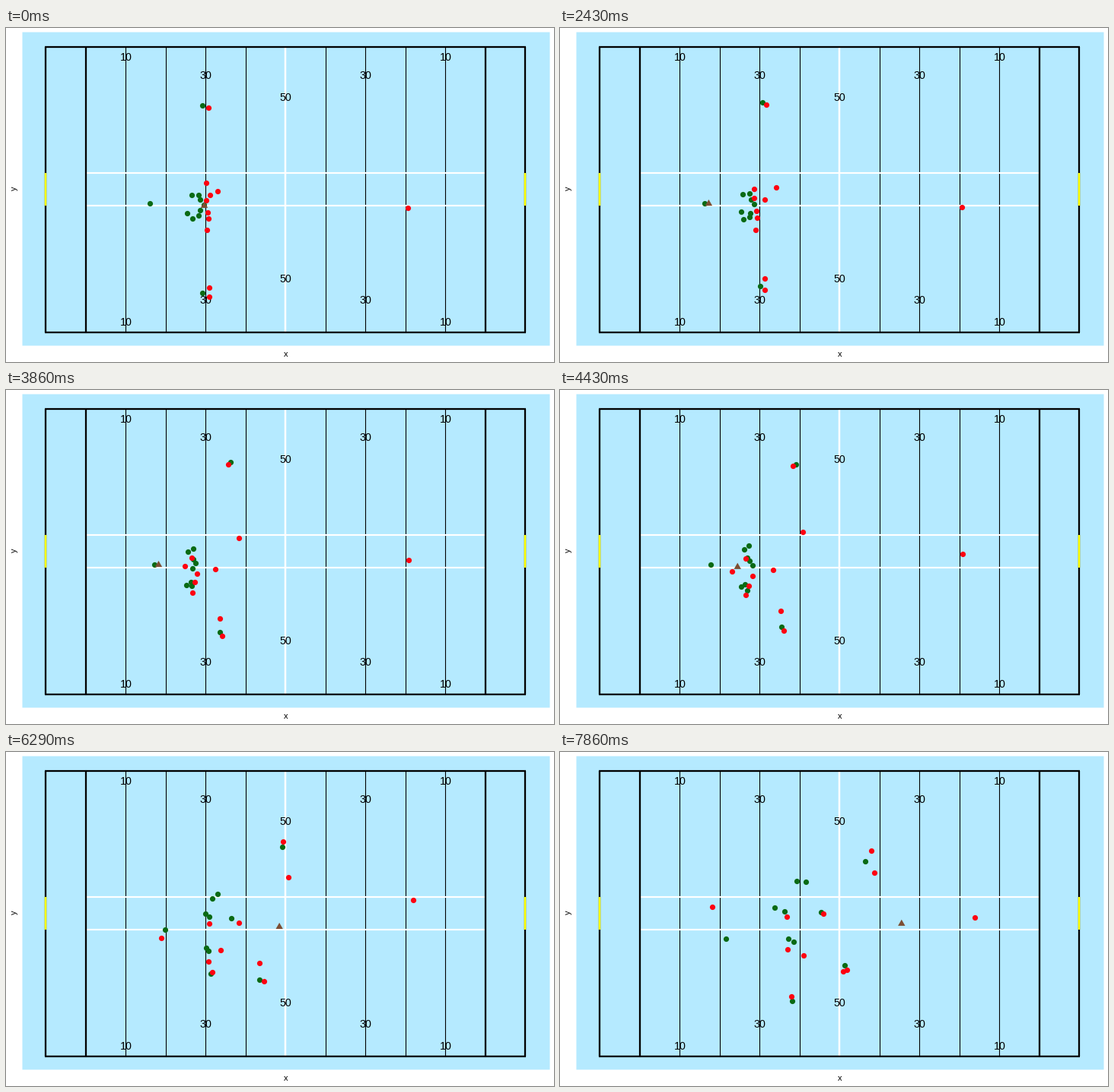
A matplotlib script for the animation above (8 s loop, 720 px wide and 440 px high).

```python
import matplotlib.pyplot as plt
import numpy as np
from matplotlib.animation import FuncAnimation
from matplotlib.patches import Polygon, Rectangle

W, H, DPI = 720, 440, 100
FRAMES, FPS = 56, 7
PT = 72 / DPI  # points per pixel

GOAL, YARD = 104.7, 5.252
TOP, BOTTOM = 24.75, 400.75
HASHES = (190.8, 234.5)

# Moments of the play, in frames
SNAP, CATCH, KICK, MID, END = 9, 15.5, 28, 37, FRAMES - 1


def run(start, mid, end, sway=(0, 0)):
    """Path from rest at the snap through mid and end.

    Sway bends the path between those points: what a player gives up
    early he makes up late, and the other way round.
    """
    start, mid, end, sway = map(np.array, (start, mid, end, sway))
    f = np.arange(FRAMES)[:, None]
    u = np.clip((f - SNAP) / (END - SNAP), 0, 1)
    m = (MID - SNAP) / (END - SNAP)
    a = ((mid - start) - (end - start) * m**3) / (m**2 * (1 - m))
    b = end - start - a
    return start + a * u**2 + b * u**3 + sway * u**2 * (u - m) * (u - 1)


def squad(sway, *routes):
    return [run(*route, sway) for route in routes]


# Each route: start, midway, end
kicker = squad((0, 0), ((189, 232), (203, 231.5), (218.6, 247)))
gunners = squad(
    (0, -370),
    ((258, 102.5), (335, 108.7), (401.6, 145)),
    ((258, 349.7), (310, 305.5), (374.8, 282)))
blockers = squad(
    (-210, 0),
    ((244, 220.5), (252, 203.7), (311.6, 171)),
    ((253.5, 220.7), (258, 197.5), (323.6, 172)),
    ((255, 227), (251.4, 218.3), (282.4, 205.4)),
    ((260, 234), (254.6, 221.8), (295.3, 211)),
    ((255.5, 240.8), (250.3, 261.4), (307.8, 251)),
    ((253.2, 247.8), (253.6, 275.7), (305, 328.7)),
    ((245.4, 251.2), (246.4, 260.4), (300.5, 246.5)),
    ((238.6, 244.4), (270.4, 226), (343, 211.5)))

jammers = squad(
    (-170, -300),
    ((266.5, 105.6), (331.3, 106.8), (409, 130.5)),
    ((267.8, 343), (308, 281.6), (372.7, 290)),
    ((267.6, 354.8), (313.6, 309), (377.3, 288)))
rushers = squad(
    (-360, -200),
    ((263, 227.2), (251, 224), (298.4, 217.3)),
    ((265, 243.5), (262.7, 251.8), (320, 269)),
    ((266.5, 251.3), (255, 270.6), (304.2, 322.8)),
    ((264.8, 266.7), (250.3, 274), (299.8, 260.2)))
edges = squad(
    (-80, 0),
    ((263, 205), (214.3, 247), (200.7, 204.8)),
    ((278.6, 215.8), (342.6, 176.4), (413.8, 159.5)))
deep = squad(
    (0, 300),
    ((268.4, 220.8), (290, 234.2), (346.8, 214)),
    ((528.6, 238), (531.7, 205), (545.7, 218.7)))

SHIFT = -0.5
green = np.array(kicker + gunners + blockers) + SHIFT
red = np.array(jammers + rushers + edges + deep) + SHIFT


def ball_at(i):
    """Snapped back to the kicker, held in front of him, then punted."""
    spot = np.array([260.5, 233.7])
    hand = green[0, min(i, KICK)] + (5.5, 0)
    if i < KICK:
        part = np.clip((i - SNAP) / (CATCH - SNAP), 0, 1)
        return spot + (hand - spot) * part
    t = i - KICK
    return hand + (10.9 * t - 0.064 * t * t, 5 * np.sin(np.pi * t / 16))


fig = plt.figure(figsize=(W / DPI, H / DPI), dpi=DPI, facecolor="white")
ax = fig.add_axes([0, 0, 1, 1])
ax.set_xlim(0, W)
ax.set_ylim(H, 0)
ax.axis("off")


def at(yard):
    return GOAL + yard * YARD


def line(xs, ys, color, width, z):
    ax.plot(xs, ys, color=color, lw=width * PT, zorder=z,
            solid_capstyle="butt")


def label(x, y, text, size, **kw):
    ax.text(x, y, text, fontsize=size * PT, family="Liberation Sans",
            color="black", ha="center", va="center", zorder=5, **kw)


def draw_field():
    ax.add_patch(Rectangle((21.5, 5.5), 693, 413, color="#b5eaff", lw=0,
                           snap=False))
    for yard in range(10, 100, 10):
        mid = yard == 50
        line([at(yard)] * 2, [TOP, BOTTOM], "white" if mid else "black",
             2.5 if mid else 1.1, 2)
    for y in HASHES:
        line([at(0), at(100)], [y, y], "white", 2.2, 3)
    for yard in (-10, 0, 100, 110):
        line([at(yard)] * 2, [TOP, BOTTOM], "black", 2.3, 4)
    for y in (TOP, BOTTOM):
        line([at(-10) - 1, at(110) + 1], [y, y], "black", 2.3, 4)
    for yard in (-10, 110):
        line([at(yard)] * 2, HASHES, "yellow", 2.5, 4.5)
    for yard, high, low in ((10, 39.3, 388.3), (30, 63.3, 359.3),
                            (50, 92.3, 331.3)):
        for spot in {yard, 100 - yard}:
            for y in (high, low):
                label(at(spot) + 0.5, y, str(yard), 14.3)
    label(367.8, 430, "x", 11)
    label(11, 211, "y", 11, rotation=90)


draw_field()
dot = dict(s=(7.2 * PT) ** 2, linewidths=0)
green_dots = ax.scatter(*green[:, 0].T, color="#0a6a14", zorder=6, **dot)
red_dots = ax.scatter(*red[:, 0].T, color="#ff0010", zorder=7, **dot)
BALL = np.array([(0, -5), (4.7, 3.2), (-4.7, 3.2)])
ball = ax.add_patch(Polygon(BALL, color="#7d4e33", lw=0, zorder=8))


def draw(i):
    green_dots.set_offsets(green[:, i])
    red_dots.set_offsets(red[:, i])
    ball.set_xy(BALL + ball_at(i))
    return green_dots, red_dots, ball


anim = FuncAnimation(fig, draw, frames=FRAMES, interval=1000 / FPS,
                     repeat=True, repeat_delay=0, blit=False)
plt.show()
```
